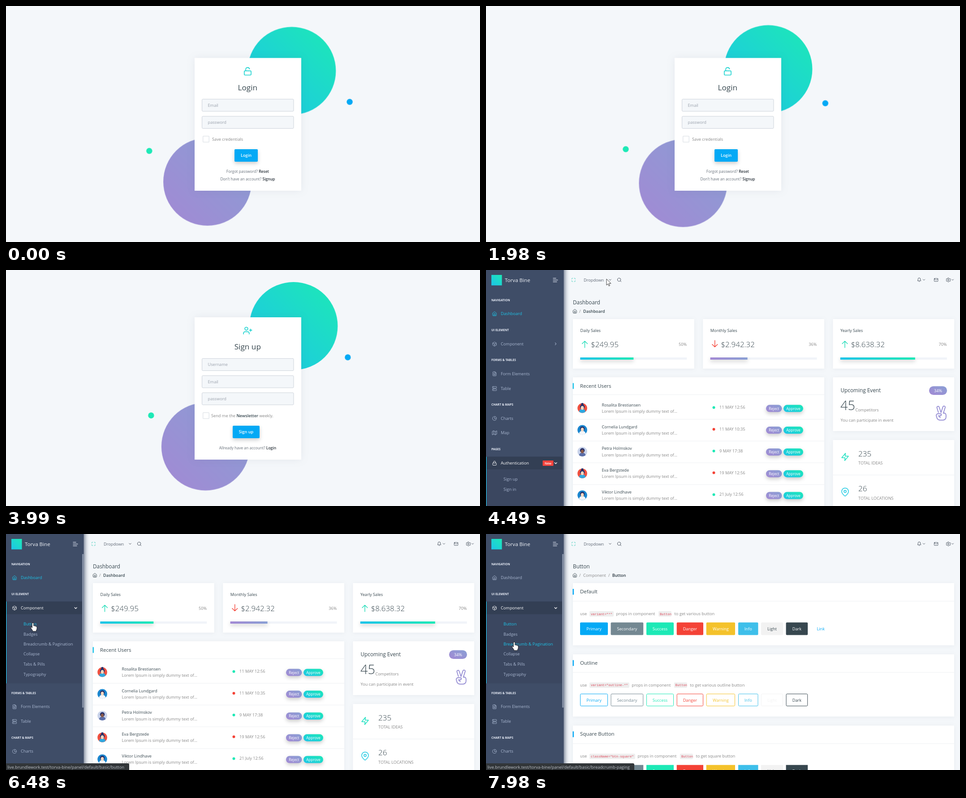
An HTML page for the animation above (8000 ms loop, 1058 by 529 pixels).

```html
<!DOCTYPE html>
<html lang="en">
<head>
<meta charset="utf-8">
<title>Admin panel tour</title>
<style>
  html, body { margin: 0; width: 100%; height: 100%; overflow: hidden; background: #f4f7fa; }
  svg { display: block; width: 100vw; height: 100vh; }
  text { font-family: 'Open Sans', sans-serif; white-space: pre; }
  .mono { font-family: 'Liberation Mono', monospace; }
  .card { fill: #fff; filter: drop-shadow(0 1px 5px rgba(69, 90, 100, .07)); }
  .panel { fill: #fff; filter: drop-shadow(0 0 9px rgba(63, 77, 103, .09)); }
  .raised { filter: drop-shadow(0 4px 4px rgba(0, 0, 0, .2)); }
  .side { fill: #3f4d67; filter: drop-shadow(1px 0 6px #3f4d67); }
</style>
</head>
<body>
<svg id="stage" viewBox="0 0 1058 529">
  <defs>
    <linearGradient id="teal" x1="1" y1="0" x2="0" y2="1"><stop stop-color="#1de9b6"/><stop offset="1" stop-color="#1dc4e9"/></linearGradient>
    <linearGradient id="violet" x1="1" y1="0" x2="0" y2="1"><stop stop-color="#899fd4"/><stop offset="1" stop-color="#a389d4"/></linearGradient>
    <linearGradient id="tealBar" x1="1" x2="0"><stop stop-color="#1de9b6"/><stop offset="1" stop-color="#1dc4e9"/></linearGradient>
    <linearGradient id="violetBar" x1="1" x2="0"><stop stop-color="#899fd4"/><stop offset="1" stop-color="#a389d4"/></linearGradient>
  </defs>
</svg>
<script>
const LOOP = 8000;
const STEPS = [0, 500, 990, 1490, 1980, 2490, 2980, 3480, 3990, 4490, 4990, 5480, 5980, 6480, 6980, 7480, 7980];
const SIGNUP = 2490, BOARD = 4490, HOVER = 5480, OPEN = 5980, PICK = 6480, LOAD = 6980, READY = 7480, LAST = 7980;
const BLUE = '#04a9f5', CYAN = '#1dc4e9', GREEN = '#1de9b6', RED = '#f44236', INK = '#37474f', GREY = '#888', NAV = '#a9b7d0';

const ICONS = {
  home: 'M3 9l9-7 9 7v11a2 2 0 0 1-2 2H5a2 2 0 0 1-2-2zM9 22V12h6v10',
  box: 'M21 16V8a2 2 0 0 0-1-1.7l-7-4a2 2 0 0 0-2 0l-7 4A2 2 0 0 0 3 8v8a2 2 0 0 0 1 1.7l7 4a2 2 0 0 0 2 0l7-4A2 2 0 0 0 21 16zM3.3 7L12 12l8.7-5M12 22V12',
  file: 'M14 2H6a2 2 0 0 0-2 2v16a2 2 0 0 0 2 2h12a2 2 0 0 0 2-2V8zM14 2v6h6M16 13H8M16 17H8M10 9H8',
  server: 'M4 2h16a2 2 0 0 1 2 2v4a2 2 0 0 1-2 2H4a2 2 0 0 1-2-2V4a2 2 0 0 1 2-2zM4 14h16a2 2 0 0 1 2 2v4a2 2 0 0 1-2 2H4a2 2 0 0 1-2-2v-4a2 2 0 0 1 2-2zM6 6h1M6 18h1',
  pie: 'M21.2 15.9A10 10 0 1 1 8 2.8M22 12A10 10 0 0 0 12 2v10z',
  map: 'M1 6v16l7-4 8 4 7-4V2l-7 4-8-4zM8 2v16M16 6v16',
  lock: 'M5 11h14a2 2 0 0 1 2 2v7a2 2 0 0 1-2 2H5a2 2 0 0 1-2-2v-7a2 2 0 0 1 2-2zM7 11V7a5 5 0 0 1 10 0v4',
  unlock: 'M5 11h14a2 2 0 0 1 2 2v7a2 2 0 0 1-2 2H5a2 2 0 0 1-2-2v-7a2 2 0 0 1 2-2zM7 11V7a5 5 0 0 1 9.9-1',
  join: 'M16 21v-2a4 4 0 0 0-4-4H5a4 4 0 0 0-4 4v2M4.5 7a4 4 0 1 0 8 0a4 4 0 1 0-8 0M20 8v6M23 11h-6',
  expand: 'M8 3H5a2 2 0 0 0-2 2v3m18 0V5a2 2 0 0 0-2-2h-3m0 18h3a2 2 0 0 0 2-2v-3M3 16v3a2 2 0 0 0 2 2h3',
  search: 'M3 11a8 8 0 1 0 16 0a8 8 0 1 0-16 0M21 21l-4.4-4.4',
  bell: 'M18 8A6 6 0 0 0 6 8c0 7-3 9-3 9h18s-3-2-3-9M13.7 21a2 2 0 0 1-3.4 0',
  mail: 'M4 4h16a2 2 0 0 1 2 2v12a2 2 0 0 1-2 2H4a2 2 0 0 1-2-2V6a2 2 0 0 1 2-2zM22 6l-10 7L2 6',
  gear: 'M10 2h4l1 3 3 1 3-1 2 4-2 2v2l2 2-2 4-3-1-3 1-1 3h-4l-1-3-3-1-3 1-2-4 2-2v-2l-2-2 2-4 3 1 3-1zM9 12a3 3 0 1 0 6 0a3 3 0 1 0-6 0',
  zap: 'M13 2L3 14h9l-1 8 10-12h-9l1-8z',
  pin: 'M21 10c0 7-9 13-9 13s-9-6-9-13a9 9 0 0 1 18 0zM9 10a3 3 0 1 0 6 0a3 3 0 1 0-6 0',
  up: 'M12 23V3M4 11l8-8 8 8',
  dn: 'M12 1v20M4 13l8 8 8-8',
  down: 'M6 9l6 6 6-6',
  right: 'M9 18l6-6-6-6'
};

// Drawing helpers; icons are centred on x, y
const icon = (name, x, y, size, color, width = 2) =>
  `<path d="${ICONS[name]}" transform="translate(${x - size / 2} ${y - size / 2}) scale(${size / 24})" fill="none" stroke="${color}" stroke-width="${width}" stroke-linecap="round" stroke-linejoin="round"/>`;
const text = (x, y, str, fill = GREY, size = 9.2, weight = 400, anchor = 'start', cls = '') =>
  `<text x="${x}" y="${y}" fill="${fill}" font-size="${size}" font-weight="${weight}" text-anchor="${anchor}" class="${cls}">${str}</text>`;
const mid = (x, y, str, fill, size, weight) => text(x, y, str, fill, size, weight, 'middle');
const bold = (str, fill = INK) => `<tspan font-weight="600" fill="${fill}">${str}</tspan>`;
const rect = (x, y, w, h, fill, rx = 0, extra = '') =>
  `<rect x="${x}" y="${y}" width="${w}" height="${h}" rx="${rx}" fill="${fill}" ${extra}/>`;
const card = (x, y, w, h, cls = 'card') => rect(x, y, w, h, '#fff', 0, `class="${cls}"`);
const rule = (x, y, w, color = '#eef0f3') => rect(x, y, w, 1, color);
const show = (from, to, body) => `<g data-from="${from}" data-to="${to}">${body}</g>`;
const shift = (dy, body) => `<g transform="translate(0 ${dy})">${body}</g>`;
const hot = (draw, from, to, color = NAV) =>
  show(BOARD, from, draw(color)) + show(from, to, draw(CYAN)) + show(to, LOOP, draw(color));

// Sign-in and sign-up screens
const disk = (x, y, r, fill, period, start) =>
  `<circle class="float" cx="${x}" cy="${y}" r="${r}" fill="${fill}" data-period="${period}" data-start="${start}"/>`;
const disks = (grow, start) =>
  disk(636, 139 - grow, 98.5, 'url(#teal)', 7000, start) +
  disk(761, 212.5 - grow, 6.7, BLUE, 9000, start) +
  disk(318, 318.5 + grow, 6.7, GREEN, 7000, start) +
  disk(443.5, 391.5 + grow, 98.5, 'url(#violet)', 9000, start);
const field = (y, label) =>
  rect(437.5, y, 204.5, 27.2, '#f4f7fa', 2, 'stroke="#ccd2da"') + text(450.5, y + 17, label, '#9aa1ac');
const check = y => rect(439.7, y, 13.5, 13.5, '#fff', 1, 'stroke="#dfe3e8" stroke-width="1.3"');
const submit = (y, w, label) =>
  rect(536 - w / 2, y, w, 28, BLUE, 2, 'class="raised"') + mid(536, y + 17.4, label, '#fff', 9.2, 600);
const note = (y, ask, action) => mid(539.4, y, ask + ' ' + bold(action, '#2b333b'), '#67707a', 8.54);

const login = disks(0, -2920) + card(421, 116.5, 238, 297.5, 'panel') +
  icon('unlock', 539.4, 146.3, 20.2, '#1dd3d0') + mid(539.3, 188.5, 'Login', INK, 17.2) +
  field(208.8, 'Email') + field(247.2, 'password') +
  check(291.7) + text(460, 301.8, 'Save credentials') + submit(321, 52, 'Login') +
  note(373.7, 'Forgot password?', 'Reset') + note(390.8, 'Don’t have an account?', 'Signup');

const signup = disks(10.5, 2190) + card(421, 106, 238, 319, 'panel') +
  icon('join', 539.4, 135.8, 20.2, '#1dd3d0') + mid(539.3, 178, 'Sign up', INK, 17.2) +
  field(198.4, 'Username') + field(236.8, 'Email') + field(275, 'password') +
  check(319.7) + text(458, 330, `Send me the ${bold('Newsletter')} weekly.`) + submit(349, 60, 'Sign up') +
  note(401.8, 'Allready have an account?', 'Login');

// Top bar and page titles
const topbar = icon('expand', 195.3, 22.2, 10, '#2fc9b5') + text(218, 25.6, 'Dropdown', '#5f6875') +
  icon('down', 277, 22, 9, '#3c4653', 2.4) + icon('search', 297.6, 22.2, 11, '#3c4653') +
  icon('bell', 967, 22, 10.5, '#3c4653') + icon('down', 977.5, 22, 8.5, '#3c4653', 2.4) +
  icon('mail', 1004.6, 22.3, 10, '#3c4653') +
  icon('gear', 1032, 22.3, 10.5, '#3c4653') + icon('down', 1041.5, 22, 8.5, '#3c4653', 2.4);
const title = (name, crumbs) => text(194, 77, name, INK, 11.8) + icon('home', 198.3, 92.3, 10.5, INK) + text(208, 96, '/') + crumbs;
const head = (y, name, color) => rect(193.5, y - 10, 2.5, 13, color) + text(210, y, name, INK, 11.4);

// Dashboard
const sale = (x, name, dir, color, sum, percent, width, fill) =>
  card(x, 110, 270.7, 111) + text(x + 16.5, 139, name, INK) + icon(dir, x + 26.5, 166, 17.5, color, 1.9) +
  text(x + 40, 173, sum, INK, 16.9, 300) + text(x + 254, 169.8, percent, GREY, 9.2, 400, 'end') +
  rect(x + 16.3, 196, 238, 5, '#f1f4f9') + rect(x + 16.3, 196, width, 5, `url(#${fill})`, 0, 'class="raised"');
const avatar = (y, bg, skin, shirt, bun) =>
  `<g transform="translate(215 ${y})"><circle r="10.8" fill="${bg}"/>` +
  `<circle cy="-9" r="${bun ? 2.6 : 0}" fill="#25316b"/><circle cy="-2.8" r="5.2" fill="#25316b"/>` +
  `<path d="M-7.2 8a7.2 6 0 0 1 14.4 0a10.8 10.8 0 0 1-14.4 0z" fill="${shirt}"/><ellipse cy="-.6" rx="3.3" ry="4.2" fill="${skin}"/></g>`;
const pill = (x, y, w, label, fill) =>
  rect(x, y, w, 16, `url(#${fill})`, 8, 'class="raised"') + mid(x + w / 2, y + 11.2, label, '#fff', 8.1);
const user = ([name, date, bg, skin, shirt], i) => shift(i * 48.8,
  avatar(309.6, bg, skin, shirt, i % 3 == 0) + text(258.5, 305.8, name, INK) +
  text(258.5, 320, 'Lorem Ipsum is simply dummy text of…') +
  `<circle cx="508.5" cy="308.2" r="3" fill="${i % 2 ? RED : GREEN}"/>` + text(521, 311.2, date) +
  pill(625, 302.3, 35.5, 'Reject', 'violet') + pill(664, 302.3, 44, 'Approve', 'teal') + rule(194, 334, 561));
const users = [
  ['Rosalita Brestiansen', '11 MAY 12:56', '#f0503f', '#fcd9c0', '#2fa8e0'],
  ['Cornelia Lundgard', '11 MAY 10:35', '#1a86cf', '#fcd9c0', '#f4f6fa'],
  ['Petra Holmskov', '9 MAY 17:38', '#c9d3ea', '#8a5a4a', '#5b6ea8'],
  ['Eva Bergstede', '19 MAY 12:56', '#f0503f', '#fcd9c0', '#2fa8e0'],
  ['Viktor Lindhave', '21 July 12:56', '#1a86cf', '#fcd9c0', '#f4f6fa']
];
const total = (y, name, color, count, label) =>
  icon(name, 801.5, y, 20, color, 1.8) + text(831, y - 1.5, count, INK, 17, 300) + text(831, y + 17, label);
const peace = '<path d="M1010 320l-3.4-11a2.6 2.6 0 0 1 5-1.5l4 12l4.2-12.6a2.6 2.6 0 0 1 5 1.6l-4 12.5c4-1 6 1.5 6 4.5v4c0 4-3 7-7 7h-6c-3.5 0-5.500-1.500-7-4l-1.500-5c-1-3 1-5 3.500-5.500l7 .5q2 4-3 4.500l-3 0q4 2 4 5" fill="none" stroke="#978fd4" stroke-width="1.9" stroke-linejoin="round"/>';
const dashboard = title('Dashboard', text(217, 96, 'Dashboard', INK, 9.2, 600)) +
  sale(194, 'Daily Sales', 'up', '#1fdcb8', '$249.95', '50%', 119, 'tealBar') +
  sale(484.3, 'Monthly Sales', 'dn', RED, '$2.942.32', '36%', 83, 'violetBar') +
  sale(774.5, 'Yearly Sales', 'up', '#1fdcb8', '$8.638.32', '70%', 167, 'tealBar') +
  card(194, 240.5, 561, 320) + head(263.5, 'Recent Users', CYAN) + rule(194, 279, 561) + users.map(user).join('') +
  card(774.5, 240.5, 270.7, 120.5) + text(791.5, 274, 'Upcoming Event', INK, 11.8) +
  rect(989, 260.5, 40, 19.5, 'url(#violet)', 9.7) + mid(1009, 273.6, '34%', '#fff') +
  text(791, 313.6, '45', INK, 28.9, 300) + text(824.5, 316.5, 'Competitors', GREY, 9) + text(791.5, 340, 'You can participate in event') + peace +
  card(774.5, 381, 270.7, 180) + rule(774.5, 459, 270.7) +
  total(419, 'zap', '#1de0c0', '235', 'TOTAL IDEAS') + total(497.8, 'pin', '#1dc9e2', '26', 'TOTAL LOCATIONS');

// Button page
const BUTTONS = [
  ['Primary', 210, 62, BLUE], ['Secondary', 278.5, 72.7, '#748892'], ['Success', 358, 61, GREEN], ['Danger', 425.7, 59.3, RED],
  ['Warning', 491.7, 64.3, '#f4c22b'], ['Info', 563, 44.5, '#3ebfea'], ['Light', 614, 49, '#f2f2f2'], ['Dark', 669.6, 48.6, INK]
];
const button = (y, outline, rx) => ([label, x, w, color]) => outline
  ? rect(x + .5, y + .5, w - 1, 27, '#fff', rx, `stroke="${color}"`) + mid(x + w / 2, y + 17.5, label, color)
  : rect(x, y, w, 28.3, color, rx) + mid(x + w / 2, y + 17.5, label, label == 'Light' ? INK : '#fff');
const code = (x, y, str, w) => rect(x, y - 9, w, 12, '#eee', 2) + text(x + 3, y - .3, str, '#dd4a5c', 7.26, 400, 'start', 'mono');
const sample = (y, name, attr, tail, outline, rx) => {
  const w = attr.length * 4.36 + 6, end = 231 + w, base = y + 72;
  return card(194, y, 851, 139.5) + head(y + 23, name, BLUE) + rule(194, y + 40, 851) +
    text(210, base, 'use') + code(231, base, attr, w) + text(end + 5.5, base, 'props in component') +
    code(end + 100, base, 'Button', 29) + text(end + 135.5, base, tail) +
    BUTTONS.map(button(y + 88.3, outline, rx)).join('');
};
const buttonTitle = title('Button', text(217, 96, 'Component') + text(273, 96, '/') + text(281.7, 96, 'Button', '#26343d', 9.2, 600));
const samples =
  sample(110, 'Default', 'variant="*"', 'to get various button', false, 2) + mid(747.3, 215.8, 'Link', BLUE) +
  sample(269.7, 'Outline', 'variant="outline-*"', 'to get various outline button', true, 2) +
  sample(429.4, 'Square Button', 'className="btn-square"', 'to get square button', false, 0);

// Sidebar
const caption = (y, str) => text(12, y, str, '#e8edf7', 6.6, 700);
const item = (y, name, label) => color => icon(name, 19, y - 3, 11, color) + text(33, y, label, color);
const entry = (y, label) => color => text(39, y, label, color);
const plain = draw => draw(NAV);
const opened = (y, h) => rect(0, y, 170.5, h, '#3b4760') + rect(0, y, 170.5, 28.5, '#333f54') + rect(0, y, 1.2, h, CYAN);
const below = caption(204, 'FORMS &amp; TABLES') + plain(item(235.7, 'file', 'Form Elements')) + plain(item(268.8, 'server', 'Table')) +
  caption(304, 'CHART &amp; MAPS') + plain(item(335.6, 'pie', 'Charts')) + plain(item(368, 'map', 'Map')) +
  caption(404, 'PAGES') + opened(418.500, 130) + item(436, 'lock', 'Authentication')('#fff') +
  rect(126.500, 427, 24, 12, '#f4433c', 1) + mid(138.500, 435.6, 'New', '#fff', 7, 600) + icon('down', 155.600, 433, 10, '#fff', 3) +
  plain(entry(472, 'Sign up')) + plain(entry(494.5, 'Sign in'));
const component = item(169, 'box', 'Component');
const thumb = h => rect(170, 45, 3.5, h, '#8490a5');
const sidebar = rect(0, -20, 173.5, 569, '', 0, 'class="side"') +
  rect(12, 11, 23.5, 23.5, 'url(#teal)') + text(42, 26.8, 'Torva Bine', '#f1f4f9', 11.6) +
  '<path d="M149.500 18.500h7M149.500 22.500h11M149.500 26.500h9" stroke="#c3cbd9" stroke-width="1.3"/>' +
  caption(69.5, 'NAVIGATION') + hot(item(101, 'home', 'Dashboard'), BOARD, LOAD) + caption(137, 'UI ELEMENT') +
  show(BOARD, OPEN, hot(c => component(c) + icon('right', 155.5, 165.500, 9.500, c, 2.600), HOVER, OPEN) + below) +
  show(OPEN, LOOP, opened(151.3, 183.500) +
    hot(c => component(c) + icon('down', 155.600, 166, 10, c, 3), OPEN, PICK, '#fff') +
    hot(entry(205, 'Button'), PICK, LOOP) + hot(entry(227.500, 'Badges'), LOAD, LAST) +
    hot(entry(249.700, 'Breadcrumb &amp; Pagination'), LAST, LOOP) +
    ['Collapse', 'Tabs &amp; Pills', 'Typography'].map((s, i) => plain(entry(272.2 + i * 22.700, s))).join('') +
    shift(154.600, below)) +
  show(4990, OPEN, thumb(396)) + show(OPEN, LOOP, thumb(344));

// Link preview and pointers
const preview = (from, to, w, path) => show(from, to,
  `<path d="M0 514H${w - 3}q3 0 3 3V529H0z" fill="#323639"/>` +
  text(3, 526, 'live.brundlework.test/torva-bine/panel/default/' + path, '#bcc1c8', 9.4));
const previews = preview(HOVER, PICK, 307.5, 'dashboard/default#!') + preview(PICK, LOAD, 275, 'basic/button') +
  preview(LOAD, LAST, 275, 'basic/badges') + preview(LAST, LOOP, 331, 'basic/breadcrumb-paging');
const ARROW = 'M0 0V14l3.200-3 2.200 5 2-1-2.100-4.800H10z';
const HAND = 'M-1.700 1.700a1.700 1.700 0 0 1 3.400 0V7q3-1.200 3.200.8 2.200-.8 2.600.8 1.500-.3 1.500 1.500V13q0 2-1.500 4v2H-.5v-1.500L-4.300 12q-1-2 .8-2.300l1.800 1.500z';
const pointer = (from, to, shape, x, y) => show(from, to,
  `<path d="${shape}" transform="translate(${x} ${y})" fill="#fff" stroke="#111" stroke-width=".8" stroke-linejoin="round"/>`);
const pointers =
  show(SIGNUP, 2980, '<path d="M602 213.500h5M602 225.500h5M604.500 213.500v12" stroke="#333" fill="none"/>') +
  pointer(BOARD, 4990, ARROW, 269, 20) + pointer(4990, HOVER, ARROW, 104, 64) +
  pointer(HOVER, PICK, HAND, 66, 174) + pointer(PICK, LOAD, HAND, 60, 199) +
  pointer(LOAD, LAST, HAND, 72.500, 224.500) + pointer(LAST, LOOP, HAND, 63, 242);

const stage = document.getElementById('stage');
stage.insertAdjacentHTML('beforeend',
  show(0, SIGNUP, login) + show(SIGNUP, BOARD, signup) +
  show(BOARD, LOOP, topbar + show(BOARD, LOAD, dashboard) + show(LOAD, LOOP, buttonTitle) + show(READY, LOOP, samples) + sidebar) +
  show(LOAD, READY, rect(92, 0, 564, 1.300, CYAN)) + previews + pointers);

const parts = [...stage.querySelectorAll('[data-from]')];
const orbits = [...stage.querySelectorAll('.float')].map(el => {
  const turn = a => `rotate(${a}deg) translate(-6.57px) rotate(${-a}deg)`;
  const anim = el.animate({ transform: [turn(0), turn(360)] },
    { duration: +el.dataset.period, easing: 'ease', iterations: Infinity });
  anim.pause();
  return { anim, start: +el.dataset.start };
});

let held = -1;
function draw(t) {
  const step = STEPS.filter(s => s <= t).pop();
  if (step === held) return;
  held = step;
  for (const { style, dataset } of parts) style.display = step >= +dataset.from && step < +dataset.to ? '' : 'none';
  for (const { anim, start } of orbits) anim.currentTime = Math.max(0, step - start);
}
const begin = performance.now();
function tick() {
  draw((performance.now() - begin) % LOOP);
  requestAnimationFrame(tick);
}
tick();
</script>
</body>
</html>
```
